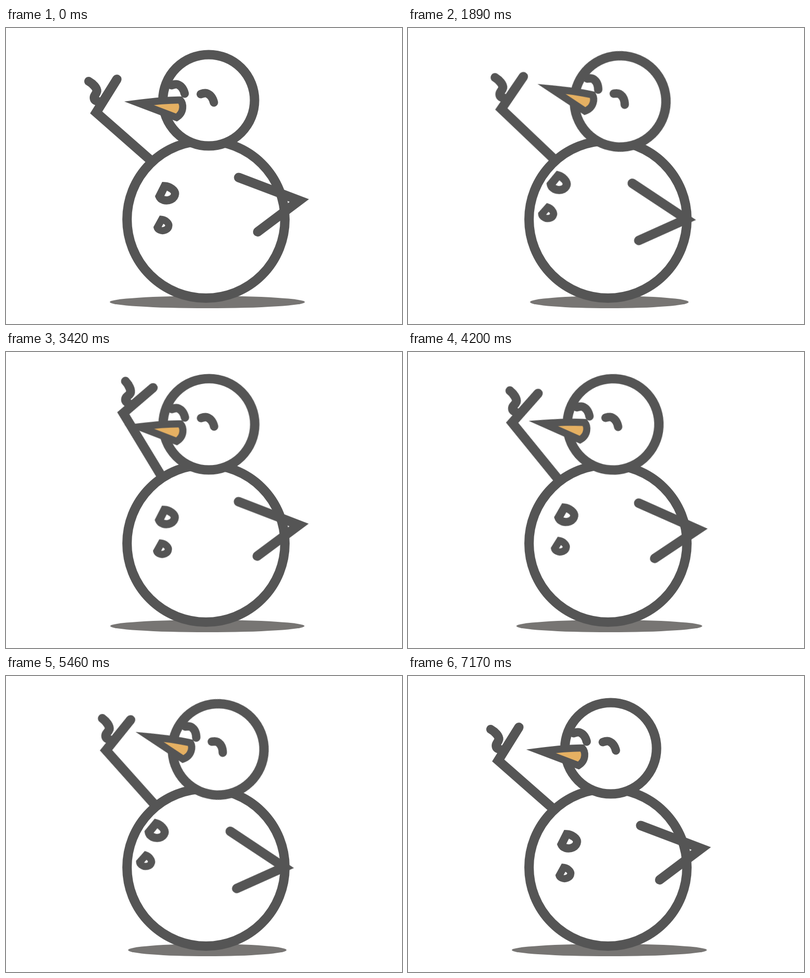
These frames come from a looping animation (800 by 600 pixels, 7.2 s). An HTML page:

```html
<!DOCTYPE html>
<html lang="en">
<head>
<meta charset="utf-8">
<title>Waving snowman</title>
<style>
  html, body { margin: 0; width: 100%; height: 100%; overflow: hidden; background: #fff; }
  svg { display: block; width: 800px; height: 600px; }

  .line { fill: none; stroke: #555; stroke-width: 19; stroke-linecap: round; stroke-miterlimit: 10; }
  .snow { fill: #fff; }
  .shadow { fill: #777573; transform-origin: 406.5px 555.5px; animation: shrink 3600ms infinite; }
  .sway { transform-origin: 409px 233px; animation: sway 3600ms infinite; }
  .wave { transform-origin: 363px 326px; animation: wave 7200ms infinite; }
  .shadow, .sway, .wave { animation-timing-function: cubic-bezier(.37, 0, .63, 1); }

  .eye { stroke-width: 17; }
  .nose { fill: #e5b062; stroke-width: 14.5; }
  .finger { stroke-width: 18; }

  @keyframes shrink { 50% { transform: scaleX(.812); } }
  @keyframes sway {
    0%, 100% { transform: rotate(0deg); }
    50% { transform: rotate(12.85deg); }
  }
  @keyframes wave {
    0%, 99.5%, 100% { transform: rotate(0deg); }
    14.5%, 49.8%, 85.5% { transform: rotate(18.1deg); }
    30.7%, 68.1% { transform: rotate(-1deg); }
  }
</style>
</head>
<body>
<svg viewBox="0 0 800 600">
  <ellipse class="shadow" cx="406.7" cy="555.5" rx="197" ry="12.5"/>

  <g class="wave">
    <path class="line" d="M224 104 L182.2 171.2 L325 297"/>
    <path class="line finger" d="M167 108 C176 113 184 122 183.5 128 C182 135 178 136 178 141 C178 146 182 148 187 149"/>
  </g>

  <circle class="line snow" cx="404" cy="388" r="159.5"/>

  <g class="sway">
    <!-- resting arm -->
    <path class="line" d="M470 303 L592.6 349.7 L508.5 413.2"/>

    <!-- buttons -->
    <path class="line" stroke-width="16.5" style="stroke-width:16.5" d="M320.5 320.5 C331 321 342 329 341.5 336 C340.5 347 328 351.5 318 348.5 C313.5 347 311 344 310 341.5 Z"/>
    <path class="line" style="stroke-width:14.5" d="M314.5 388 C322 389 329 395 329 400 C328.5 409 318 413 310.5 409.5 C307.5 408 306 406.5 305.5 404.5 Z"/>

    <!-- head -->
    <circle class="line snow" cx="409.5" cy="146.5" r="92.6"/>
    <path id="eye" class="line eye" d="M393.5 134 C399 132 403 131 407 133 C414 136 418 143 420 151"/>
    <use href="#eye" x="-59" y="-18"/>
    <path class="line nose" d="M268.5 152.5 C296 149 325 145.5 352 146 C358.5 153 361 171 344.5 181.5 Z"/>
  </g>
</svg>
</body>
</html>
```
